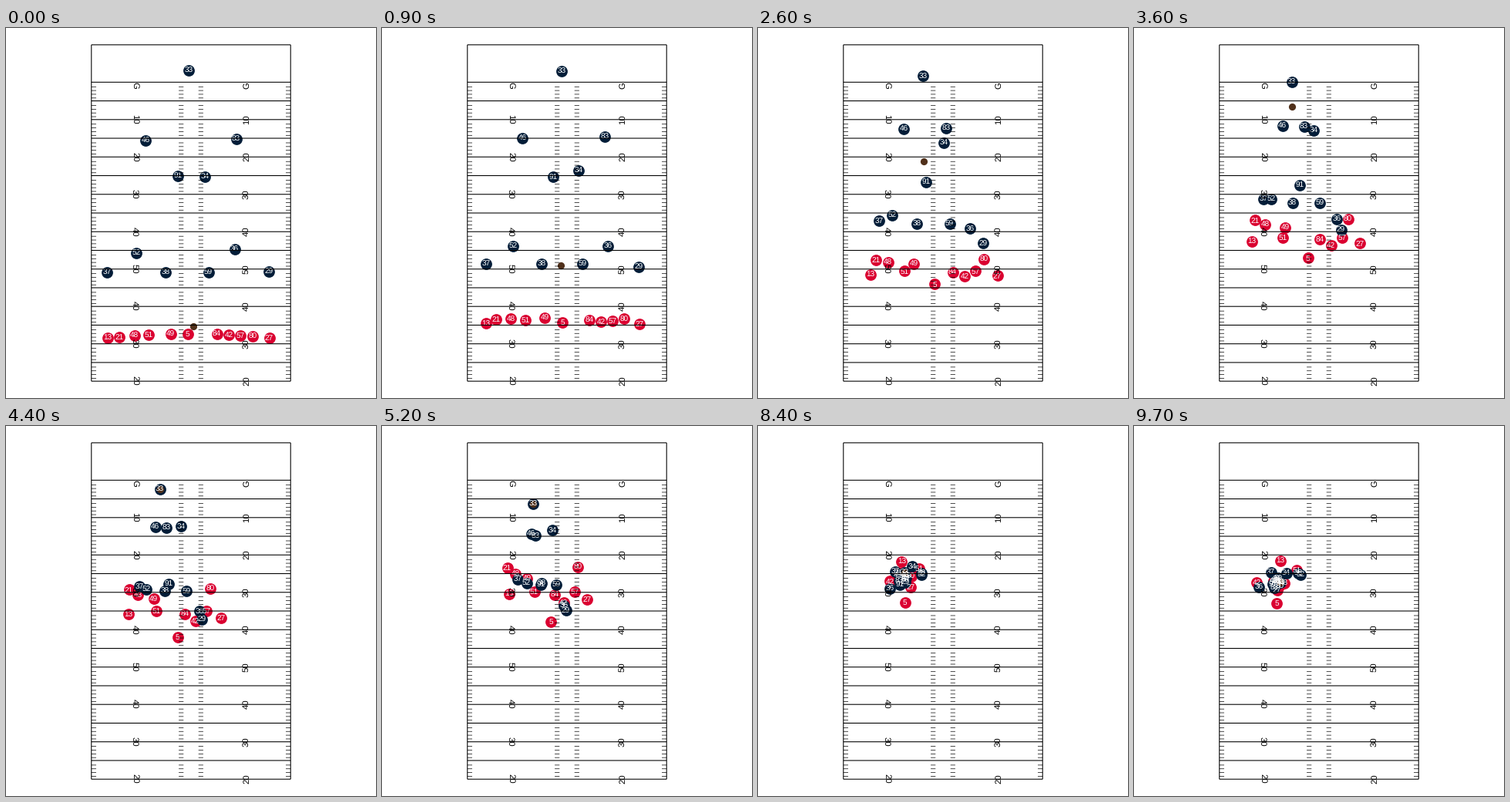
Write a matplotlib script that moves like this. It is 480 px wide and 480 px high and loops after 9.8 s.

```python
import numpy as np
import matplotlib.pyplot as plt
from matplotlib.animation import FuncAnimation

SIZE, DPI = 480, 100
FRAMES, INTERVAL = 98, 100
RED, NAVY, BROWN = "#DA0030", "#021D38", "#50301A"

# The field is 90 yards long and 53.3 wide, with a 5 % margin at each end.
YARD = SIZE / 1.1 / 90
TOP, BOTTOM = SIZE / 2 - 45 * YARD, SIZE / 2 + 45 * YARD
LEFT, RIGHT = SIZE / 2 - 26.65 * YARD, SIZE / 2 + 26.65 * YARD
GOAL = TOP + 10 * YARD

LAST = FRAMES - 1
CATCH = 40                        # frame at which the returner has the ball
MEET = {RED: 52, NAVY: 36}        # frame at which each team closes in
LAUNCH = {RED: 0.35, NAVY: 0}     # initial share of the mean running speed

plt.rcParams["font.family"] = "Liberation Sans"
plt.rcParams["text.hinting"] = "none"
rng = np.random.default_rng(4)


def px(n):
    """Pixels to points."""
    return n * 72 / DPI


def hermite(a, b, va, vb, span):
    """Cubic from a to b with end velocities va and vb, one row per frame."""
    t = (np.arange(span) / span)[:, None]
    return (a + (b - a) * t**2 * (3 - 2 * t)
            + span * (va * t * (1 - t)**2 - vb * t**2 * (1 - t)))


def run_path(team, start, meet, end):
    """Run from the start to the meeting point, then close in on the pile."""
    start, meet, end = (np.array(p, float) for p in (start, meet, end))
    first = MEET[team]
    second = LAST - first
    v1, v2 = (meet - start) / first, (end - meet) / second
    turn = 0.7 * v1 + 0.3 * v2
    return np.vstack([hermite(start, meet, LAUNCH[team] * v1, turn, first),
                      hermite(meet, end, turn, 0 * v2, second), end])


paths = {RED: {}, NAVY: {}}


def add(team, number, start, meet, end=None):
    if end is None:
        end = rng.normal((188, 201), 4)
    paths[team][number] = run_path(team, start, meet, end)


def kick(number, x, meet, end=None):
    """Kickers line up on a shallow arc."""
    add(RED, number, (x, 396.5 + 5.5 * ((x - 237) / 105)**2), meet, end)


def receive(number, start, meet, end=None):
    add(NAVY, number, start, meet, end)


kick(13, 132, (164.5, 218), (190, 174.5))
kick(21, 147, (162.5, 184))
kick(48, 166.5, (173, 192))
kick(51, 185, (197.5, 214.5), (211, 186.5))
kick(49, 213.5, (188, 198))
kick(5, 235.5, (219, 253.5), (185, 230))
kick(84, 273.5, (224, 219))
kick(42, 289, (235.5, 229), (159, 202.5))
kick(57, 304, (250, 214.5))
kick(80, 320, (254, 183))
kick(27, 341.5, (266, 224.5), (185.5, 213))

receive(33, (237, 55), (204.5, 70), (190, 203))
receive(46, (181, 146), (192.5, 127))
receive(83, (298.5, 143.5), (220.5, 127.5))
receive(91, (223, 192), (215, 203.5))
receive(34, (258, 192.5), (233, 133), (197.5, 191))
receive(52, (169, 291.5), (178, 222), (216, 192.5))
receive(36, (296.5, 287), (263, 248), (162, 208.5))
receive(37, (131, 317), (168, 222), (177.5, 189.5))
receive(38, (207, 317), (205.5, 227), (213, 190.5))
receive(59, (262.5, 316.5), (241, 227))
receive(29, (341, 316), (268.5, 262))

# The kick slows slightly on its way to the returner, who then carries the ball.
ball_path = paths[NAVY][33].copy()
kick_off = np.array([242.5, 386.5])
t = (np.arange(CATCH) / CATCH)[:, None]
ball_path[:CATCH] = kick_off + (ball_path[CATCH] - kick_off) * (t + 0.15 * t * (1 - t))

fig = plt.figure(figsize=(SIZE / DPI, SIZE / DPI), dpi=DPI, facecolor="white")
ax = fig.add_axes([0, 0, 1, 1])
ax.set(xlim=(0, SIZE), ylim=(SIZE, 0))
ax.axis("off")


def draw_field():
    line = dict(color="black", linewidth=px(1.07), zorder=5, snap=False)
    ax.hlines([TOP, *(GOAL + 5 * YARD * np.arange(17))], LEFT, RIGHT, **line)
    ax.vlines([LEFT, RIGHT], TOP, BOTTOM, **line)

    marks = [GOAL + YARD * k + 1.1 for k in range(80) if k % 5]
    width = 6.2
    for x in (LEFT, LEFT + 23.37 * YARD, LEFT + 29.93 * YARD - width, RIGHT - width):
        ax.hlines(marks, x, x + width, color="black", linewidth=px(0.7),
                  zorder=5, snap=False)

    for i in range(9):
        label = 50 - 10 * abs(i - 5) or "G"
        y = GOAL + 10 * YARD * i + (4.6 if i == 0 else -0.4)
        for x, angle in ((167, 270), (312, 90)):
            ax.text(x, y, label, rotation=angle, ha="center", va="center",
                    fontsize=px(11.4), color="black", zorder=5)


def dots(color, diameter, zorder):
    return ax.scatter([], [], s=px(diameter) ** 2, color=color,
                      linewidths=0, zorder=zorder)


draw_field()
teams = {RED: dots(RED, 14.8, 1), NAVY: dots(NAVY, 14.8, 2)}
ball = dots(BROWN, 9.2, 3)
numbers = {(team, n): ax.text(0, 0, n, color="white", fontsize=px(10),
                              ha="center", va="center", zorder=4)
           for team in paths for n in paths[team]}


def update(frame):
    for team, marks in teams.items():
        marks.set_offsets([path[frame] for path in paths[team].values()])
    ball.set_offsets([ball_path[frame]])
    for (team, n), label in numbers.items():
        x, y = paths[team][n][frame]
        label.set_position((x, y + 0.6))
    return [*teams.values(), ball, *numbers.values()]


anim = FuncAnimation(fig, update, frames=FRAMES, interval=INTERVAL,
                     init_func=lambda: update(0), repeat=True, repeat_delay=0)
plt.show()
```
